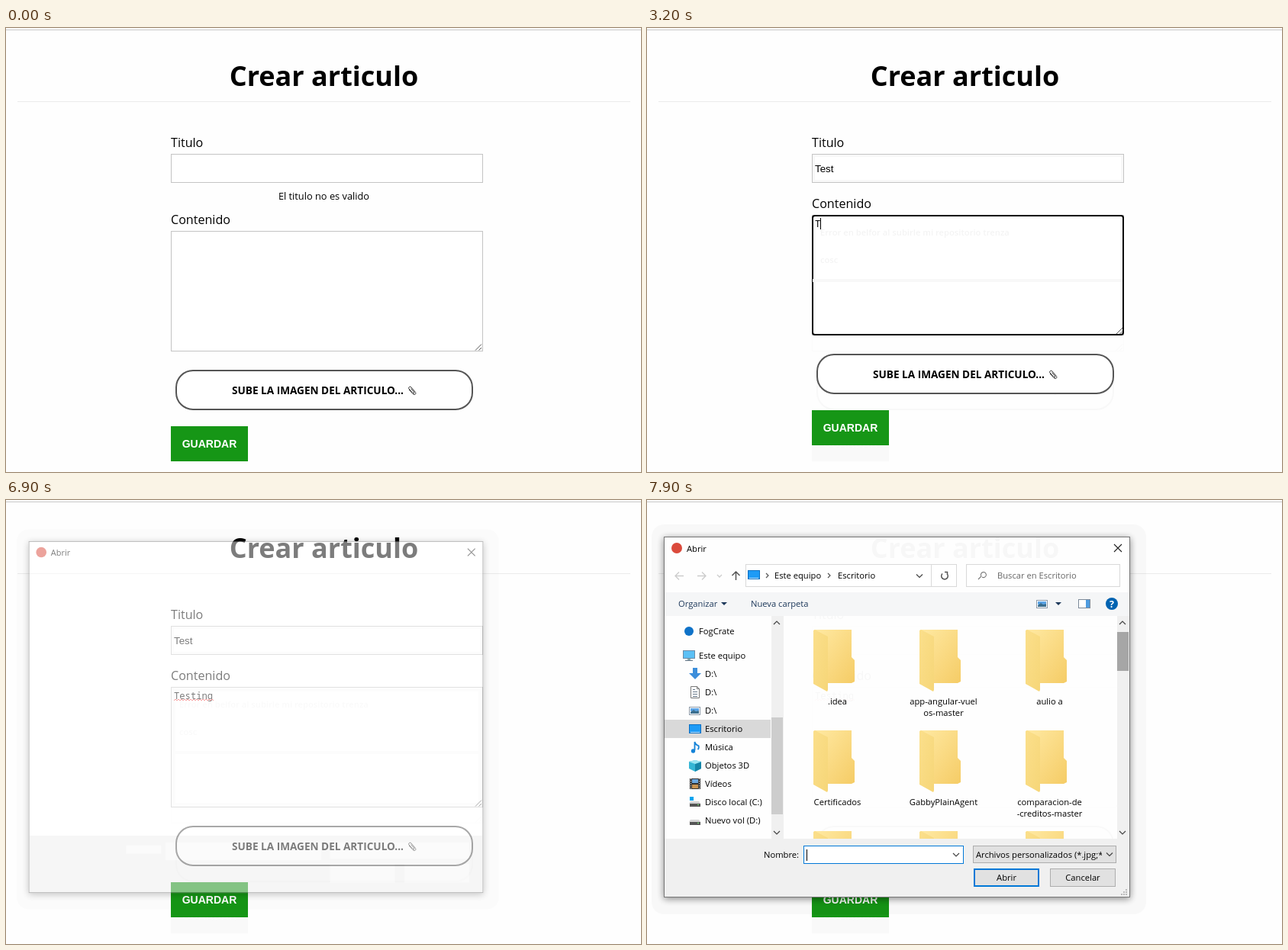
Recreate the animation shown at these times as an HTML page. Size 832 px wide and 582 px high, loop 8000 ms.

```html
<!DOCTYPE html>
<html lang="es">
<head>
<meta charset="utf-8">
<title>Crear articulo</title>
<style>
html, body { margin: 0; width: 100%; height: 100%; overflow: hidden; background: #fefefe; }
svg { display: block; font-family: "Open Sans", "Noto Sans", sans-serif; }
text { white-space: pre; }
.arial { font-family: "Liberation Sans", Arial, sans-serif; }
.mono { font-family: "Noto Sans Mono", "DejaVu Sans Mono", monospace; }
.mid { text-anchor: middle; }
.bold { font-weight: 700; }
.semi { font-weight: 600; }
.grey { filter: grayscale(1); }
.panel { filter: drop-shadow(0 0 1px #0006); }
.window { filter: drop-shadow(0 2px 5px #0007); }
</style>
</head>
<body>
<svg id="stage" width="832" height="582" viewBox="0 0 832 582"></svg>
<script>
const LOOP = 8000;

// Markup helpers
const text = (x, y, s, size = 11.2, cls = '', fill = '#000') =>
  `<text x="${x}" y="${y}" font-size="${size}" class="${cls}" fill="${fill}">${s}</text>`;
const rect = (x, y, w, h, fill, more = '') =>
  `<rect x="${x}" y="${y}" width="${w}" height="${h}" fill="${fill}" ${more}/>`;
const box = (x, y, w, h, stroke, fill = '#fff', sw = 1, more = '') =>
  rect(x + sw / 2, y + sw / 2, w - sw, h - sw, fill, `stroke="${stroke}" stroke-width="${sw}" ${more}`);
const line = (d, stroke, sw = 1, fill = 'none') =>
  `<path d="${d}" fill="${fill}" stroke="${stroke}" stroke-width="${sw}"/>`;
const shape = (d, fill) => `<path d="${d}" fill="${fill}"/>`;
const disc = (x, y, r, fill) => `<circle cx="${x}" cy="${y}" r="${r}" fill="${fill}"/>`;
const down = (x, y, c = '#444') => line(`M${x - 4} ${y - 2}l4 4 4-4`, c, 1.2);
const up = (x, y, c = '#444') => line(`M${x - 4} ${y + 2}l4-4 4 4`, c, 1.2);
const right = (x, y) => line(`M${x - 1.5} ${y - 3}l3 3-3 3`, '#555', 1.2);
const during = (from, to, s) => `<g data-from="${from}" data-to="${to}">${s}</g>`;

function page() {
  const lower =
    text(216, 257, 'Contenido', 16.1) +
    box(216, 266, 409, 158, '#c4c4c4') +
    line('M615 422.5l8-8M619.500 422.500l3.500-3.500', '#555') +
    box(222, 448, 390, 53, '#555', '#fff', 2, 'rx="22"') +
    text(296, 480, 'SUBE LA IMAGEN DEL ARTICULO...', 13.6, 'bold') +
    line('M528 474l5 5.500c2 2 5 .5 3.500-2l-5.500-6.500c-1.500-2-4.500 0-3 2l5 5.500c1 1 2.500 0 1.500-1.500l-4-4.500', '#333') +
    rect(216, 522, 101, 46, '#169616') +
    text(266.5, 550, 'GUARDAR', 14, 'arial bold mid', '#fff');
  let wave = 'M220 263';
  for (let i = 0; i < 13; i++) wave += 'l2-2 2 2';

  return rect(0, 2, 832, 1, '#c8c8c8') +
    text(416.5, 76, 'Crear articulo', 36, 'bold mid') +
    rect(15, 96, 803, 1, '#ebebeb') +
    text(216, 156, 'Titulo', 16.1) +
    box(216, 165, 409, 38, '#c4c4c4') +
    during(2000, LOOP, box(217, 166, 407, 36, '#f8f8f8', 'none', 3)) +
    during(600, 2000, box(216, 165, 409, 38, '#000', '#fff', 2, 'rx="2"')) +
    text(220, 189, '', 13.333, 'arial').replace('<text', '<text id="name"') +
    rect(0, 177, 1, 15, '#000', 'id="nameCaret"') +
    during(0, 1000, text(416.5, 225, 'El titulo no es valido', 12.8, 'mid')) +
    during(1000, LOOP, '<use href="#lower" opacity=".03" class="grey"/>') +
    `<g id="shift"><g id="lower">${lower}</g></g>` +
    during(2000, 5700, box(216, 245, 409, 158, '#000', '#fff', 2, 'rx="3"') +
      line('M615 401l8-8M619.500 401l3.500-3.500', '#555')) +
    during(5700, LOOP, box(217, 246, 407, 156, '#f8f8f8', 'none', 5) +
      line('M615 401.500l8-8M619.500 401.500l3.500-3.500', '#555')) +
    during(1000, LOOP, '<use href="#hints" opacity=".045"/>' + rect(217, 329, 406, 4, '#f8f8f8')) +
    text(220, 261, '', 12.2, 'mono').replace('<text', '<text id="body"') +
    rect(0, 249, 1, 15, '#000', 'id="bodyCaret"') +
    during(5500, LOOP, line(wave, '#e33', .9));
}

function suggestions() {
  const panel = h => rect(216, 205, 409, h, '#fff', 'class="panel" rx="3"');
  return `<g id="drop">` +
    during(600, 1000, panel(125) + '<g id="hints">' +
      text(227, 272, 'Error en belfor al subirle mi repositorio trenza', 11.2, 'semi') +
      text(227, 308, 'cosc', 11.2, 'semi') + '</g>') +
    during(1000, 1600, panel(53)) +
    during(600, 1600, text(227, 236, 'Test', 11.2, 'semi')) + '</g>';
}

// Small icons, drawn around (0, 0)
const screen = box(-8, -6, 16, 12, '#0b6fc2', '#1e9bf6') + rect(-6, 4, 12, 1, '#bfe4ff');
const photo = box(-8, -5, 15, 11, '#8c9aa8') + rect(-6, -3, 11, 4, '#5ba4e6') + shape('M-6 4v-2l4-3 3 2 4-1v4z', '#3c6f8f');
const sheet = line('M-5.5-7.500h8l3 3v12h-11z', '#777', 1, '#fff') + line('M2.500-7.500v3h3', '#777');
const drive = shape('M-6-1h11l2 3h-15z', '#d4d4d4') + rect(-7, 2, 14, 4, '#555') + rect(3, 3, 2, 1, '#7e7');
const icons = {
  cloud: disc(0, 0, 6, '#0f72c8'),
  pc: box(-8, -7, 16, 11, '#6b8ca8', '#5cc0f5') + rect(-2, 4, 4, 2, '#8aa') + rect(-5, 6, 10, 1, '#678'),
  arrow: shape('M-3-8h6v7h5l-8 8-8-8h5z', '#3c8edb'),
  sheet: sheet + line('M-3-3.500h3M-3-.5h6M-3 2.500h6M-3 5.500h6', '#678'),
  photo, screen,
  note: line('M-.5 4v-11q1 4 5 5 1 3-1 5', '#1583d8', 1.8) + disc(-2.5, 5, 2.7, '#1583d8'),
  cube: shape('M-8-5l8-2 8 2v9l-8 4-8-4z', '#35b6d5') + shape('M0-2l8-3v9l-8 4z', '#1685a8') + shape('M-8-5l8-2 8 2-8 3z', '#9be5f2'),
  film: rect(-7, -7, 14, 14, '#333') + rect(-4, -6, 8, 5, '#6aa7e0') + rect(-4, 1, 8, 5, '#c89452') +
    line('M-5.500-7v14M5.500-7v14', '#ddd', 1).replace('<path', '<path stroke-dasharray="1.5 1.5"'),
  system: drive + rect(-7, -7, 5, 5, '#00a4ef'),
  drive
};
const icon = (kind, x, y) => `<g transform="translate(${x} ${y})">${icons[kind]}</g>`;

function sidebar() {
  const rows = [
    ['FogCrate', 172, 'cloud'], ['Este equipo', 204, 'pc'],
    ['D:\\', 228, 'arrow'], ['D:\\', 252, 'sheet'], ['D:\\', 276, 'photo'],
    ['Escritorio', 300, 'screen'], ['Música', 324, 'note'], ['Objetos 3D', 348, 'cube'],
    ['Vídeos', 372, 'film'], ['Disco local (C:)', 396, 'system'], ['Nuevo vol (D:)', 420, 'drive']
  ];
  let s = rect(23, 288, 139, 24, '#d9d9d9') + rect(163, 152, 16, 292, '#f0f0f0') +
    rect(163, 285, 15, 127, '#cdcdcd') + up(170, 161) + down(170, 436);
  for (const [label, y, kind] of rows) {
    const x = y < 210 ? 55 : 63;
    s += text(x + 13, y + 4, label);
    if (kind === 'screen') s += icon(kind, x, y);
    else s += (kind === 'pc' ? '' : during(7300, 7500, `<g transform="translate(${x} ${y})">${sheet}</g>`)) +
      during(7500, LOOP, icon(kind, x, y));
  }
  return s;
}

function toolbar() {
  const navy = '#1e395b';
  return line('M48 99.500h-11m5-5l-5 5 5 5M66 99.500h11m-5-5l5 5-5 5M92 98l3 3 3-3', '#ccc', 1.3) +
    line('M116.500 105v-11m-5 5l5-5 5 5', '#555', 1.5) +
    box(129, 84, 277, 30, '#d9d9d9') + icon('screen', 140, 98) + right(157.5, 99) +
    text(167, 103, 'Este equipo') + right(238.5, 99) + text(250, 103, 'Escritorio') +
    down(357, 99.5) + rect(372, 85, 1, 28, '#d9d9d9') +
    line('M387 96.500a4.300 4.300 0 1 0 6 0M390 94.500h3.500v3.500', '#555', 1.5) +
    box(418, 84, 202, 30, '#d9d9d9') +
    line('M434 104l4-4a3.500 3.500 0 1 1 1 1', '#777', 1.1) +
    text(459, 103, 'Buscar en Escritorio', 11.2, '', '#666') +
    rect(23, 121, 609, 31, '#f5f6f7') +
    text(41, 140, 'Organizar', 11.2, '', navy) + shape('M97 134h8l-4 4z', navy) +
    text(136, 140, 'Nueva carpeta', 11.2, '', navy) +
    icon('photo', 518, 136) + shape('M535 134h8l-4 4z', navy) +
    box(565, 130, 16, 12, '#7d8a99') + rect(575, 131, 5, 10, '#4f9ce0') +
    disc(609, 136, 8, '#0063b1') + text(609, 140.5, '?', 12.5, 'bold mid', '#fff');
}

function files() {
  const names = [['.idea'], ['app-angular-vuel', 'os-master'], ['aulio a'],
    ['Certificados'], ['GabbyPlainAgent'], ['comparacion-de', '-creditos-master']];
  const folder = (x, y) => `<g transform="translate(${x} ${y})">` +
    shape('M1 0h49v36l4 4v28l-4 2h-33z', 'url(#gold)') +
    shape('M0 1l2-1 17 9v70l-1 2-18-10z', 'url(#flap)') + '</g>';
  let labels = '', pics = '';
  for (let i = 0; i < 9; i++) {
    const x = 218 + i % 3 * 139, y = 170 + Math.floor(i / 3) * 132;
    pics += folder(x, y);
    (names[i] || []).forEach((s, k) => labels += text(x + 31.5, y + 98 + 15 * k, s, 11.2, 'mid'));
  }
  return during(7600, LOOP, labels) + during(7700, LOOP, `<g clip-path="url(#list)">${pics}</g>`);
}

function footer() {
  let grip = '';
  for (let i = 0; i < 3; i++)
    for (let j = 0; j <= i; j++) grip += rect(627 - 3 * j, 510 + 3 * i, 2, 2, '#bbb');
  return rect(23, 444, 609, 76, '#f0f0f0') +
    during(0, 7500, rect(153, 457, 47, 11, '#f9f9f9') + rect(206, 453, 209, 24, '#f8f8f8') +
      rect(427, 453, 187, 22, '#f8f8f8') + rect(427, 482, 87, 25, '#f8f8f8') + rect(527, 482, 87, 25, '#f8f8f8')) +
    during(7500, LOOP,
      text(153, 469, 'Nombre:') + box(205, 453, 210, 24, '#0078d7') + rect(209, 458, 1, 15, '#000') + down(405, 465) +
      box(427, 453, 188, 23, '#adadad', '#e1e1e1') +
      `<g clip-path="url(#combo)">${text(431, 469, 'Archivos personalizados (*.jpg;*.png)')}</g>` + down(606, 464.5) +
      box(428, 483, 86, 24, '#0078d7', '#e1e1e1', 2) + text(471, 499, 'Abrir', 11.2, 'mid') +
      box(528, 483, 86, 24, '#adadad', '#e1e1e1') + text(571, 499, 'Cancelar', 11.2, 'mid') + grip);
}

function dialog() {
  return '<g id="dialog">' +
    rect(6, 32, 648, 511, '#000', 'rx="16" opacity=".025"') +
    rect(22, 48, 611, 473, '#fff', 'class="window" opacity=".97"') +
    disc(39, 63, 7, '#db4a3c') + text(52, 68, 'Abrir') +
    line('M612 58l10 10M622 58l-10 10', '#222', 1.1) +
    during(7400, LOOP, toolbar()) + during(7300, LOOP, sidebar()) + files() +
    during(7300, 7700, rect(616, 169, 16, 258, '#f0f0f0') + rect(616, 169, 15, 55, '#cdcdcd')) +
    during(7700, LOOP, rect(616, 152, 16, 292, '#f0f0f0') + up(623, 161) + down(623, 436)) +
    during(7700, 7900, rect(616, 169, 15, 55, '#a6a6a6')) +
    during(7900, LOOP, rect(616, 173, 15, 51, '#a6a6a6')) +
    footer() + box(22, 48, 611, 473, '#777', 'none') + '</g>';
}

const gradient = (id, a, b) => `<linearGradient id="${id}" x2="1" y2="1"><stop stop-color="${a}"/>` +
  `<stop offset="1" stop-color="${b}"/></linearGradient>`;
const $ = id => document.getElementById(id);

$('stage').innerHTML = '<defs>' + gradient('gold', '#ffe9a2', '#f5cc66') + gradient('flap', '#fbdf8b', '#f6d678') +
  `<clipPath id="list">${rect(180, 152, 436, 292, '#000')}</clipPath>` +
  `<clipPath id="combo">${rect(428, 454, 168, 21, '#000')}</clipPath></defs>` +
  page() + suggestions() + dialog();

const timed = [...document.querySelectorAll('[data-from]')];
const show = (el, on) => el.setAttribute('display', on ? 'inline' : 'none');
const passed = (t, ...times) => times.filter(k => k <= t).length;
const within = (t, a, b) => t >= a && t < b;

function type(id, word, count, caretOn) {
  const el = $(id), caret = $(id + 'Caret');
  el.textContent = word.slice(0, count);
  caret.setAttribute('x', 220 + Math.round(count ? el.getComputedTextLength() : 0));
  show(caret, caretOn);
}

function draw(t) {
  for (const el of timed) show(el, within(t, +el.dataset.from, +el.dataset.to));
  $('shift').setAttribute('transform', `translate(0 ${t < 1000 ? 0 : -21})`);
  $('drop').setAttribute('opacity', t < 700 ? .5 : 1);

  type('name', 'Test', passed(t, 1000, 1200, 1400, 1600), within(t, 600, 2000));
  const blink = within(t, 2400, 2900) || within(t, 3800, 3900) || within(t, 5000, 5500);
  type('body', 'Testing', passed(t, 3200, 3300, 3900, 4100, 4200, 4400, 4500), within(t, 2000, 5700) && !blink);

  const fade = [0, .5, .85, 1][passed(t, 6900, 7000, 7100)];
  const scale = .95 + .05 * fade;
  show($('dialog'), fade > 0);
  $('dialog').setAttribute('opacity', fade);
  $('dialog').setAttribute('transform', `translate(327.5 284.5) scale(${scale}) translate(-327.5 -284.5)`);
}

const start = performance.now();
function tick() {
  draw((performance.now() - start) % LOOP);
  requestAnimationFrame(tick);
}
tick();
</script>
</body>
</html>
```
